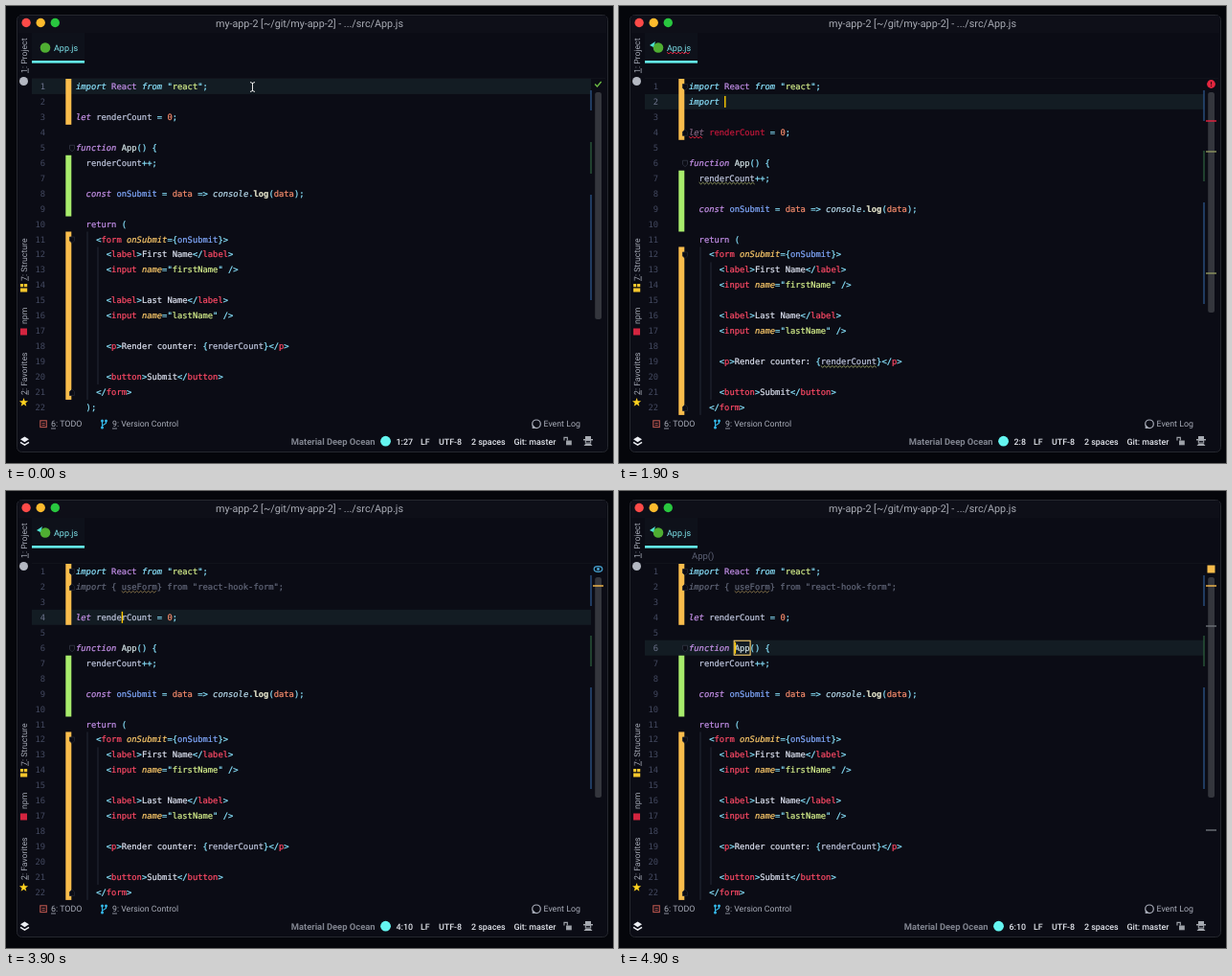
An HTML page with a canvas for the animation above (5000 ms loop, 634 by 477 pixels).

```html
<!DOCTYPE html>
<html lang="en">
<head>
<meta charset="utf-8">
<title>Editor</title>
<style>
html, body { margin: 0; width: 100%; height: 100%; overflow: hidden; background: #05060b; }
canvas { display: block; width: 634px; height: 477px; }
</style>
</head>
<body>
<canvas id="stage" width="634" height="477"></canvas>
<script>
const ctx = document.getElementById('stage').getContext('2d');
const LOOP = 5000, STEP = 100;
const CHAR = 5.3, ROW = 15.95, LEFT = 73, TOP = 76;
const MONO = '8.8px "DejaVu Sans Mono", monospace';
const UI = 'Roboto, sans-serif';
const CYAN = '#89e4ff', AQUA = '#64f5f0', YELLOW = '#f9bd4c', RED = '#e8213f';

// style letter -> [colour, font style]
const STYLES = {
  i: ['#8be4ff', 'italic'], k: ['#c792ea', 'italic'], r: ['#c38fe8', ''], v: ['#c0c7de', ''],
  p: [CYAN, ''], s: ['#d6f08c', ''], n: ['#f78c6c', ''], b: ['#82aaff', ''],
  y: ['#d4e4e6', ''], a: ['#ffcb6b', 'italic'], t: ['#ff4a66', ''], x: ['#dde2f0', ''],
  c: ['#b9dcee', 'italic'], l: ['#e6e6cc', 'bold'], w: ['#e8ecf6', ''],
  g: ['#626779', ''], G: ['#626779', 'italic'], e: ['#c1173a', ''], d: ['#80647f', 'italic']
};

const field = (label, name) => [
  `p      <·tlabel·p>·x${label}·p</·tlabel·p>`,
  `p      <·tinput ·aname·p="·s${name}·p" />`
];
const HEAD = 'iimport ·rReact ·ifrom ·p"·sreact·p";';
const LET = 'klet ·vrenderCount ·p= ·n0·p;';
const LET_BAD = 'dlet ·erenderCount ·p= ·n0·p;';
const BODY = [
  '', 'kfunction ·yApp·p() {', 'v  renderCount·p++;', '',
  'k  const ·bonSubmit ·p= ·ndata ·p=> ·cconsole·p.·llog·p(·ndata·p);', '',
  'r  return ·p(', 'p    <·tform ·aonSubmit·p={·bonSubmit·p}>',
  ...field('First Name', 'firstName'), '',
  ...field('Last Name', 'lastName'), '',
  'p      <·tp·p>·xRender counter: ·p{·vrenderCount·p}</·tp·p>', '',
  'p      <·tbutton·p>·xSubmit·p</·tbutton·p>', 'p    </·tform·p>', 'p  );'
];

// each entry changes part of the editor state from its time on
const EVENTS = [
  [0, { ln: 1, col: 27, line: null, mark: 'check', mouse: true }],
  [400, { ln: 2, col: 1, line: '', mark: 'pause', mouse: false }],
  ...[...'import '].map((c, i) => [800 + i * STEP,
    { line: 'i' + 'import '.slice(0, i + 1), col: i + 2 }]),
  [1500, { mark: 'error', bad: true }],
  [2100, { line: 'iimport ·p{}', col: 9, mark: 'pause', braces: true }],
  [2300, { line: 'iimport ·p{ }', col: 10 }],
  [2500, { line: 'iimport ·p{ ·vu·p}', col: 11 }],
  [2600, { line: 'iimport ·p{ ·vus·p}', col: 12, popup: true }],
  [2700, { line: 'iimport ·p{ ·vuse·p}', col: 13 }],
  [3200, { line: 'iimport ·p{ ·vuseForm·p} ·ifrom ·p"·sreact-hook-form·p";', col: 17, popup: false, mark: 'eye' }],
  [3400, { line: 'Gimport ·g{ ·wuseForm·g} from "react-hook-form";', col: 10, sel: true, braces: false }],
  [3700, { line: 'Gimport ·g{ useForm} from "react-hook-form";', sel: false, unused: true }],
  [3800, { ln: 3, col: 1 }],
  [3900, { ln: 4, col: 10, bad: false }],
  [4000, { boxes: 'count', mark: 'warn' }],
  [4100, { ln: 5, col: 1 }],
  [4500, { ln: 6, col: 10, boxes: '' }],
  [4600, { crumb: true }],
  [4900, { boxes: 'app' }]
];
const stateAt = t => Object.assign({}, ...EVENTS.filter(e => e[0] <= t).map(e => e[1]));

function rect(x, y, w, h, color) {
  ctx.fillStyle = color;
  ctx.fillRect(x, y, w, h);
}
function disc(x, y, r, color) {
  ctx.fillStyle = color;
  ctx.beginPath();
  ctx.arc(x, y, r, 0, 7);
  ctx.fill();
}
function path(points, color, width = 1, fill = false) {
  ctx.beginPath();
  points.forEach(([x, y]) => ctx.lineTo(x, y));
  if (fill) {
    ctx.fillStyle = color;
    ctx.fill();
  } else {
    ctx.strokeStyle = color;
    ctx.lineWidth = width;
    ctx.stroke();
  }
}
function frame(x, y, w, h, color, width = 1) {
  ctx.strokeStyle = color;
  ctx.lineWidth = width;
  ctx.strokeRect(x, y, w, h);
}
function text(str, x, y, color, font = '8.9px ' + UI, align = 'left') {
  ctx.font = font;
  ctx.fillStyle = color;
  ctx.textAlign = align;
  ctx.fillText(str, x, y);
  return ctx.measureText(str).width;
}
function wave(x0, x1, y, color) {
  const pts = [];
  for (let x = x0, i = 0; x <= x1; x += 2, i++) pts.push([x, y + (i % 2 ? 1 : -0.8)]);
  path(pts, color, 0.9);
}
const rowTop = n => TOP + (n - 1) * ROW;
const colX = c => LEFT + c * CHAR;

function code(src, x, y) {
  for (const part of src.split('·')) {
    const [color, style] = STYLES[part[0]];
    const str = part.slice(1);
    text(str, x, y, color, style + ' ' + MONO);
    // a hairline gives the heavier weight of the editor font
    ctx.strokeStyle = color;
    ctx.lineWidth = 0.22;
    ctx.strokeText(str, x, y);
    x += str.length * CHAR;
  }
}

function sideLabel(str, y, key) {
  ctx.save();
  ctx.translate(21.5, y);
  ctx.rotate(-Math.PI / 2);
  text(str, 0, 0, '#a3a7b3', '8.7px ' + UI);
  if (key) rect(0, 1.2, 5, 0.8, '#a3a7b3');
  ctx.restore();
}

function drawShell(s) {
  rect(0, 0, 634, 477, '#05060b');
  ctx.beginPath();
  ctx.roundRect(11.5, 9.5, 617, 456, 5);
  ctx.fillStyle = '#0b0c15';
  ctx.fill();
  ctx.strokeStyle = '#25272e';
  ctx.lineWidth = 1;
  ctx.stroke();
  rect(13, 10, 614, 18, '#0e0f18');
  ['#fc4a48', '#fdbb2d', '#29c73f'].forEach((c, i) => disc(21.1 + i * 15.1, 17.5, 4.7, c));
  text('my-app-2 [~/git/my-app-2] - .../src/App.js', 317, 22, '#a9acb5', '10.75px ' + UI, 'center');

  // tab
  rect(27, 28, 55, 31, '#0e111a');
  rect(27, 57, 55, 2.6, AQUA);
  disc(41, 43.5, 5.3, '#4fae32');
  if (!s.mouse) path([[32, 41], [38, 37], [36, 43]], '#4fe3d2', 1, true);
  text('App.js', 50, 46.8, '#7fe6ee', '9px ' + UI);
  if (s.bad) wave(50, 75, 49, RED);
  rect(27, 75, 599, 1, '#11131b');
  if (s.crumb) text('App()', 76, 71, '#5d6275', '9.5px ' + UI);

  // left tool bar
  sideLabel('1: Project', 70, true);
  disc(18.5, 78.5, 4.5, '#b4b8c2');
  sideLabel('7: Structure', 287, true);
  rect(15, 290, 3.2, 3.2, '#f5c52c');
  rect(19, 290, 3.2, 3.2, '#f5c52c');
  rect(15, 294.5, 7.2, 4, '#f5c52c');
  sideLabel('npm', 332);
  rect(15, 336.5, 7, 7, '#d3243f');
  sideLabel('2: Favorites', 406, true);
  path(Array.from({ length: 10 }, (_, i) => {
    const a = i * Math.PI / 5 - Math.PI / 2, r = i % 2 ? 2 : 4.8;
    return [18.5 + r * Math.cos(a), 413.8 + r * Math.sin(a)];
  }), '#ffd21f', 1, true);
}

function drawGutter(s, shift) {
  const bar = (a, b, color) => rect(62.3, rowTop(a), 6, (b - a + 1) * ROW, color);
  bar(1, 3 + shift, YELLOW);
  bar(6 + shift, 9 + shift, '#a8ec6c');
  bar(11 + shift, 21 + shift, YELLOW);
  for (let n = 1; n <= 22; n++) {
    text(n, 41, rowTop(n) + 11, n === s.ln ? '#6d748d' : '#434960', MONO, 'right');
  }
  const fold = (n, dir, color) => {
    const y = rowTop(n) + 8.5, top = y - 3 * dir, low = y + dir;
    const shape = [[66.5, top], [71.5, top], [71.5, low], [69, y + 3.5 * dir], [66.5, low], [66.5, top]];
    path(shape, '#0b0c15', 1, true);
    path(shape, color, 0.8);
  };
  fold(5 + shift, 1, '#343846');
  fold(11 + shift, 1, '#222633');
  fold(21 + shift, -1, '#222633');
  if (s.bad || s.unused) {
    fold(1, 1, '#222633');
    fold(s.line.length > 9 ? 2 : 4, -1, '#222633');
  }
  rect(84.5, rowTop(11 + shift), 1, 11 * ROW, '#252936');
  rect(95.5, rowTop(12 + shift), 1, 9 * ROW, '#252936');
}

function drawPopup() {
  rect(101, 108, 393, 77, '#11121d');
  rect(101, 108, 393, 15.5, '#191b2c');
  const rows = [
    ['Form', '<FormValues>({mode, reValidateMode, validationSchema, defau…', ''],
    ['DeferredValue', '<T>(value: T, config?: TimeoutConfig | null) (mo…', 'T'],
    ['FormContext', '<T>() (react-hook-form)', 'FormContextValues<T>'],
    ['Transition', '(config?: Suspense…', '[TransitionStartFunction, boolean]']
  ];
  rows.forEach(([name, rest, type], i) => {
    const y = 119 + i * 15.1;
    text('ƒ', 108, y, '#c77dff', 'italic bold 9.5px "DejaVu Sans Mono", monospace');
    text('use', 121, y, '#84e6ff', 'bold ' + MONO);
    text(name, 121 + 3 * CHAR, y, '#b4d8ec', MONO);
    text(rest, 121 + (3 + name.length) * CHAR, y, '#7f86ab', MONO);
    text(type, 486.5, y, '#7f86ab', MONO, 'right');
  });
  text('Press ^. to choose the selected (or first) suggestion and insert a dot afterwards', 105, 180.4, '#70f5f0');
  text('Next Tip', 421, 180.4, '#70f5f0');
  [174, 177, 180].forEach(y => rect(485, y, 1.8, 1.8, '#f5d33c'));
}

function drawCode(s) {
  const typed = s.line !== null, shift = typed ? 1 : 0;
  const lines = [HEAD, ...(typed ? [s.line] : []), '', s.bad ? LET_BAD : LET, ...BODY];
  ctx.save();
  ctx.beginPath();
  ctx.rect(27, TOP, 600, 352);
  ctx.clip();
  rect(27, rowTop(s.ln), 584, ROW, '#131c23');
  drawGutter(s, shift);
  if (s.braces) [7, s.col - 1].forEach(c => rect(colX(c), rowTop(2) + 1, CHAR, ROW - 2, '#31506a'));
  lines.forEach((src, i) => src && code(src, LEFT, rowTop(i + 1) + 11));

  const box = (n, c, len, color = '#e4e6ec') =>
    frame(colX(c) - 0.5, rowTop(n) + 0.5, len * CHAR + 1, ROW - 1, color, 1.1);
  const squiggle = (n, c, len, color) => wave(colX(c), colX(c + len), rowTop(n) + 13.2, color);
  if (s.bad) {
    squiggle(4, 0, 3, RED);
    squiggle(7, 2, 11, '#9fa866');
    squiggle(19, 26, 11, '#9fa866');
  }
  if (s.unused) squiggle(2, 9, 7, '#8f7a4c');
  if (s.sel) box(2, 9, 7);
  if (s.boxes === 'count') {
    box(4, 4, 11);
    box(7, 2, 11);
    box(19, 26, 11);
  }
  if (s.boxes === 'app') box(6, 9, 3, '#ffd470');
  if (!s.mouse) rect(colX(s.col - 1), rowTop(s.ln) + 2, 1.4, 12, '#ffcc00');
  ctx.restore();

  if (s.popup) drawPopup();
  if (s.mouse) {
    path([[255, 79.5], [257.5, 80.5], [260, 79.5]], '#e8e8e8');
    path([[257.5, 80], [257.5, 89]], '#e8e8e8');
    path([[255, 89.5], [257.5, 88.5], [260, 89.5]], '#e8e8e8');
  }
}

function drawStripe(s) {
  const typed = s.line !== null;
  ctx.beginPath();
  ctx.roundRect(615.2, 90, 6.8, typed ? 230 : 237, 2.5);
  ctx.fillStyle = '#34363d';
  ctx.fill();
  const spans = typed ? [[88, 120], [151, 183], [205, 311]] : [[88, 109], [142, 175], [197, 307]];
  spans.forEach(([a, b], i) => rect(610.3, a, 1.4, b - a, i === 1 ? '#2a583a' : '#2a5080'));

  const tick = (y, color) => rect(613, y - 0.7, 11, 1.4, color);
  if (s.bad) {
    tick(120, RED);
    tick(152, '#8f9660');
    tick(279, '#8f9660');
  }
  if (s.sel) tick(99, '#4a6b50');
  if (s.unused) tick(99, YELLOW);
  if (s.boxes === 'count') [120, 152, 279].forEach(y => tick(y, '#6d7178'));
  if (s.boxes === 'app') [141, 354].forEach(y => tick(y, '#6d7178'));

  if (s.mark === 'check') path([[615.2, 81.5], [617.5, 84], [621.7, 79]], '#6fbf45', 1.3);
  if (s.mark === 'pause') {
    rect(615.5, 78, 2.2, 6.5, '#e08a2c');
    rect(619.3, 78, 2.2, 6.5, '#e08a2c');
  }
  if (s.mark === 'error') {
    disc(618.5, 81.5, 4.4, '#e3263f');
    rect(618, 79, 1.1, 3.2, '#3c0a12');
    rect(618, 83, 1.1, 1.1, '#3c0a12');
  }
  if (s.mark === 'eye') {
    ctx.beginPath();
    ctx.ellipse(618.5, 81.5, 4.3, 2.8, 0, 0, 7);
    ctx.strokeStyle = '#4aa9d8';
    ctx.lineWidth = 1.2;
    ctx.stroke();
    disc(618.5, 81.5, 1.4, '#4aa9d8');
  }
  if (s.mark === 'warn') rect(614.5, 77.5, 8, 8, YELLOW);
}

function drawBottom(s) {
  const soft = '#a9adb9', bright = '#e2e5ec';
  // tool buttons
  frame(35.8, 432.8, 6.5, 6.8, '#b9554e', 1.1);
  rect(37.5, 435, 3.2, 0.9, '#b9554e');
  rect(37.5, 437, 3.2, 0.9, '#b9554e');
  text('6: TODO', 47, 439.3, soft);
  rect(47, 440.6, 5, 0.8, soft);
  path([[100.5, 433], [100.5, 440]], '#35b8e8', 1.1);
  path([[104.5, 433.5], [104.5, 435.5], [100.5, 438]], '#35b8e8', 1.1);
  [[100.5, 433], [104.5, 433], [100.5, 440]].forEach(([x, y]) => disc(x, y, 1.5, '#35b8e8'));
  text('9: Version Control', 111, 439.3, soft, '8.75px ' + UI);
  rect(111, 440.6, 5, 0.8, soft);
  ctx.beginPath();
  ctx.arc(554, 436.3, 4.3, 0, 7);
  ctx.strokeStyle = soft;
  ctx.lineWidth = 1.2;
  ctx.stroke();
  path([[550, 437], [549.6, 441], [554, 440.8]], soft, 1, true);
  text('Event Log', 561.5, 439.3, soft, '8.8px ' + UI);

  // layers
  path([[15, 452.3], [19.5, 449.5], [24, 452.3], [19.5, 455.2]], '#eceef3', 1, true);
  path([[15, 455.3], [19.5, 458.2], [24, 455.3]], '#eceef3', 1.5);

  // status fields, laid out from the right
  const font = '500 8.9px ' + UI, y = 457.5;
  text('LF', 433, y, bright, font);
  text('UTF-8', 452, y, bright, font);
  text('2 spaces', 486, y, bright, font);
  text('Git: master', 530.5, y, bright, font);
  let x = 425;
  x -= text(s.ln + ':' + s.col, x, y, bright, font, 'right');
  if (s.sel) x -= 12 + text('7 chars', x - 12, y, bright, font, 'right');
  disc(x - 11, 454.2, 5.4, AQUA);
  text('Material Deep Ocean', x - 22, 457.7, '#80848f', 'bold 9.4px ' + UI, 'right');

  // open lock
  rect(585, 453.5, 5.8, 4.8, '#9da1a8');
  path([[583, 453.5], [583, 450.3], [586.3, 450.3], [586.3, 453.5]], '#9da1a8', 1.2);
  // inspector
  rect(605, 449, 6, 3, '#a7abb2');
  rect(603, 452, 10, 1.4, '#a7abb2');
  frame(605.3, 453.6, 5.4, 2.4, '#a7abb2', 1);
  path([[603.5, 459], [605.5, 456.7], [610.5, 456.7], [612.5, 459]], '#a7abb2', 1, true);
}

function draw(now) {
  const t = Math.floor(now % LOOP / STEP) * STEP;
  const s = stateAt(t);
  ctx.textRendering = 'geometricPrecision';
  drawShell(s);
  drawCode(s);
  drawStripe(s);
  drawBottom(s);
}

let start;
function tick(now) {
  start ??= now;
  draw(Math.max(0, now - start));
  requestAnimationFrame(tick);
}
requestAnimationFrame(tick);
</script>
</body>
</html>
```
